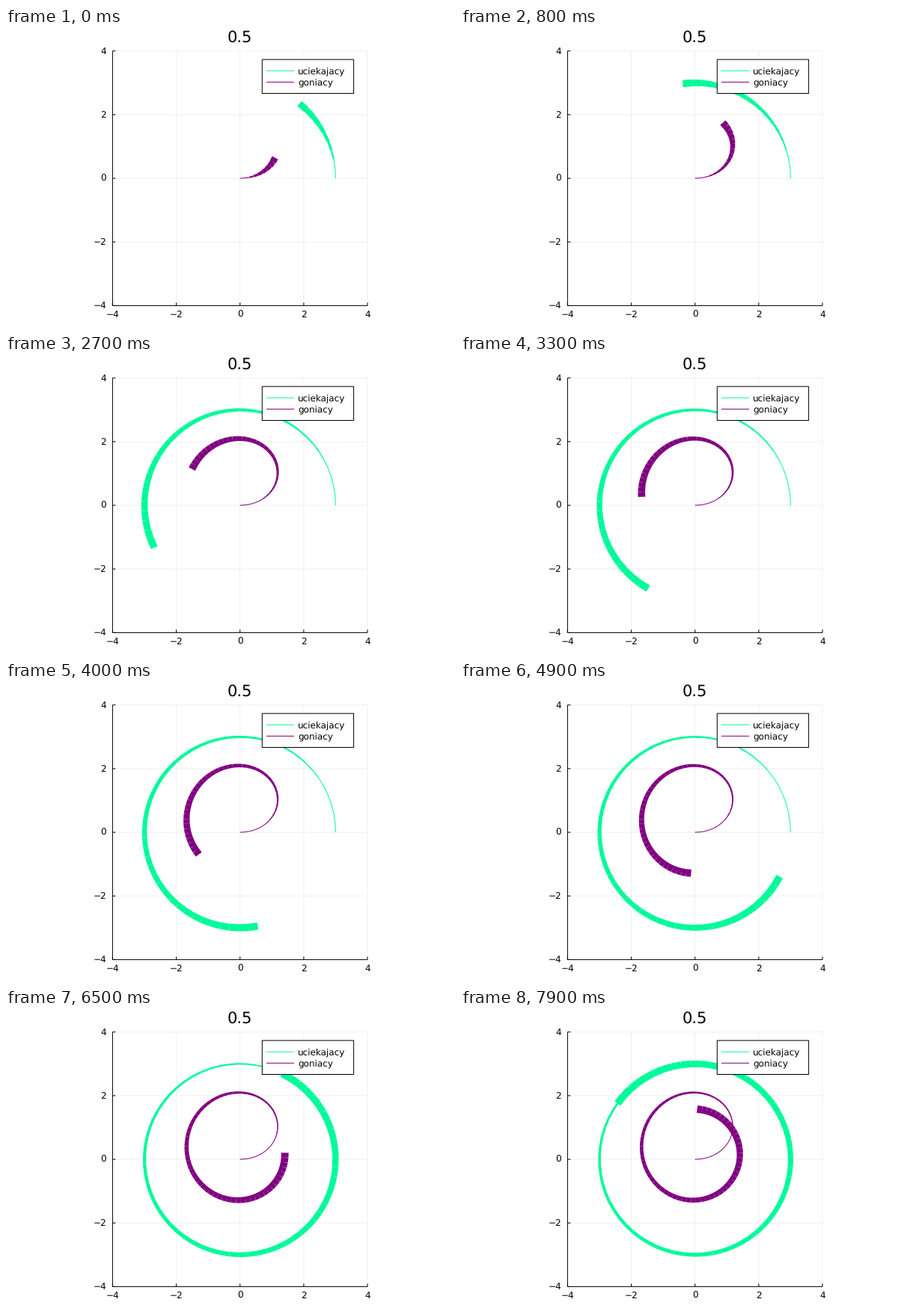
Animation of 600 by 400 pixels, one loop 8000 ms. Source, as a matplotlib script:

```python
import numpy as np
import matplotlib.pyplot as plt
from matplotlib.animation import FuncAnimation
from matplotlib.collections import LineCollection
from matplotlib.patches import Rectangle

W, H, DPI = 600, 400, 100
FRAMES, INTERVAL = 80, 100
LEFT, TOP, SIDE = 142.4, 30.75, 340.65   # plot area in pixels
RIGHT, BOTTOM = LEFT + SIDE, TOP + SIDE
LIM = 4
SCALE = SIDE / (2 * LIM)
RADIUS, RATIO, DT = 3, 0.5, 0.1
FIRST = 10                               # points in the first trail
PX = 72 / DPI                            # points per pixel
SMALL, LARGE = 12, 21
GREEN, PURPLE = "mediumspringgreen", "purple"

plt.rcParams.update({
    "font.family": "DejaVu Sans",
    "text.hinting": "none",
    "path.snap": False,
    "lines.solid_capstyle": "butt",
})


def evader(t):
    return RADIUS * np.array([np.cos(t), np.sin(t)])


def velocity(t, p):
    d = evader(t) - p
    return RATIO * RADIUS * d / np.hypot(*d)


def chase(count):
    """Pursuit curve from the centre, integrated with RK4."""
    path = [np.zeros(2)]
    for i in range(count - 1):
        t, p = i * DT, path[-1]
        k1 = velocity(t, p)
        k2 = velocity(t + DT / 2, p + k1 * DT / 2)
        k3 = velocity(t + DT / 2, p + k2 * DT / 2)
        k4 = velocity(t + DT, p + k3 * DT)
        path.append(p + (k1 + 2 * k2 + 2 * k3 + k4) * DT / 6)
    return np.array(path)


def px(x):
    return LEFT + (x + LIM) * SCALE


def py(y):
    return BOTTOM - (y + LIM) * SCALE


def segments(path):
    points = np.column_stack([px(path[:, 0]), py(path[:, 1])])
    return np.stack([points[:-1], points[1:]], axis=1)


total = FIRST + FRAMES - 1
runner = segments(evader(np.arange(total) * DT).T)
hunter = segments(chase(total))

# One axes in pixel coordinates, y pointing down
fig = plt.figure(figsize=(W / DPI, H / DPI), dpi=DPI, facecolor="white")
ax = fig.add_axes([0, 0, 1, 1])
ax.set(xlim=(0, W), ylim=(H, 0))
ax.axis("off")


def line(x0, y0, x1, y1, color="black", **style):
    ax.plot([x0, x1], [y0, y1], color=color, linewidth=PX, **style)


def label(x, y, text, size=SMALL, ha="center"):
    ax.text(x, y, text, fontsize=size * PX, ha=ha, va="baseline", zorder=5)


for v in range(-LIM, LIM + 1, 2):
    x, y = px(v), py(v)
    text = str(v).replace("-", "\u2212")
    line(x, TOP, x, BOTTOM, alpha=0.06, zorder=1)
    line(LEFT, y, RIGHT, y, alpha=0.06, zorder=1)
    line(x, BOTTOM, x, BOTTOM - 4)
    line(LEFT, y, LEFT + 4, y)
    label(x, 387, text)
    label(134.2, y + 4, text, ha="right")
line(LEFT, TOP, LEFT, BOTTOM)
line(LEFT, BOTTOM, RIGHT, BOTTOM)
label(px(0), 18.4, "0.5", LARGE)

# Legend: two rows with an even margin
box_top, row = TOP + SIDE / 30, 15.13
ax.add_patch(Rectangle((342.3, box_top), 122.3, 3 * row, facecolor="white",
                       edgecolor="black", linewidth=PX, zorder=4))
for i, (color, name) in enumerate([(GREEN, "uciekajacy"), (PURPLE, "goniacy")]):
    y = box_top + (i + 1) * row
    line(348, y, 385, y, color, zorder=5)
    label(390.4, y + 4, name, ha="left")

trails = []
for path, color in [(runner, GREEN), (hunter, PURPLE)]:
    trail = LineCollection([], colors=color, capstyle="butt", zorder=3)
    ax.add_collection(trail, autolim=False)
    trails.append((trail, path))


def update(frame):
    count = FIRST + frame
    widths = np.maximum(np.linspace(0, 10, count)[:-1], 1) * PX
    for trail, path in trails:
        trail.set_segments(path[:count - 1])
        trail.set_linewidth(widths)
    return [trail for trail, _ in trails]


anim = FuncAnimation(fig, update, frames=FRAMES, interval=INTERVAL,
                     repeat=True, repeat_delay=0)
plt.show()
```
